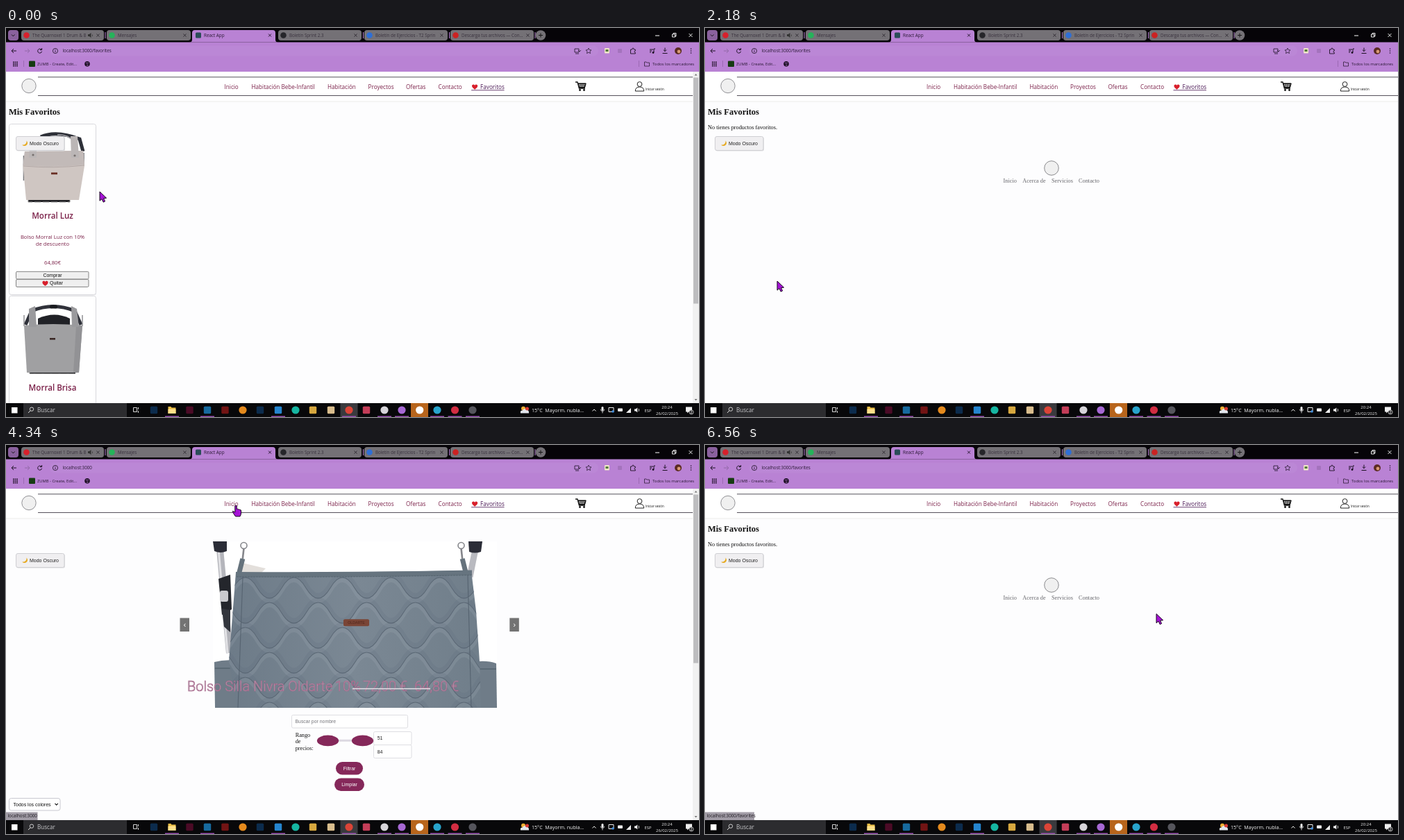
Recreate the animation shown at these times as an HTML page. Size 998 by 561 pixels, loop 6580 ms.

```html
<!DOCTYPE html>
<html lang="es">
<head>
<meta charset="utf-8">
<title>Mis Favoritos</title>
<style>
html, body { margin: 0; width: 100%; height: 100%; overflow: hidden; background: #fff; }
svg { display: block; width: 998px; height: 561px; }
text { white-space: pre; }
.ui { font-family: "Open Sans", "Noto Sans", sans-serif; }
.arial { font-family: "Liberation Sans", Arial, sans-serif; }
.serif { font-family: "Liberation Serif", "Times New Roman", serif; }
.thin { font-family: Roboto, "Open Sans", sans-serif; font-weight: 300; }
</style>
</head>
<body>
<svg id="stage" viewBox="0 0 998 561" xmlns="http://www.w3.org/2000/svg"></svg>
<script>
const LOOP = 6580;
const WINE = '#7b2149';
const PURPLE = '#b982d4';

// ---- drawing helpers ----
const rect = (x, y, w, h, fill, more = '') =>
  `<rect x="${x}" y="${y}" width="${w}" height="${h}" fill="${fill}" ${more}/>`;
const circle = (x, y, r, fill, more = '') =>
  `<circle cx="${x}" cy="${y}" r="${r}" fill="${fill}" ${more}/>`;
const path = (d, fill, more = '') => `<path d="${d}" fill="${fill}" ${more}/>`;
const line = (d, color, w = 1, more = '') =>
  path(d, 'none', `stroke="${color}" stroke-width="${w}" ${more}`);
const text = (x, y, s, size, fill, cls = 'ui', more = '') =>
  `<text x="${x}" y="${y}" font-size="${size}" fill="${fill}" class="${cls}" ${more}>${s}</text>`;
const mid = (x, y, s, size, fill, cls, more = '') =>
  text(x, y, s, size, fill, cls, 'text-anchor="middle" ' + more);
const group = (id, body, more = '') => `<g id="${id}" ${more}>${body}</g>`;
const move = (x, y, body) => `<g transform="translate(${x} ${y})">${body}</g>`;
const heart = (x, y) => move(x, y,
  path('M0 3.8C-2.6 1.8-4.1.4-4.1-1.4-4.1-4-.9-4.3 0-2.2.9-4.3 4.1-4 4.1-1.4 4.1.4 2.6 1.8 0 3.8Z', '#d8202c'));
const cross = (x, y, c, r = 2) =>
  line(`M${x - r} ${y - r}l${2 * r} ${2 * r}m0 ${-2 * r}l${-2 * r} ${2 * r}`, c, 0.9);

// ---- browser window ----
function tabs() {
  const list = [
    [22, 119, '#d8202c', 'The Quarnoxel 1 Drum &amp; B'],
    [145, 121, '#25b35a', 'Mensajes'],
    [392, 120, '#26262a', 'Boletín Sprint 2.3'],
    [516, 120, '#2f6fd6', 'Boletín de Ejercicios - T2 Sprin'],
    [640, 120, '#cc2222', 'Descarga tus archivos — Con...'],
  ];
  let s = rect(0, 0, 998, 20.5, '#060408');
  s += rect(3, 3, 15, 15, '#8a619e', 'rx="4"') + line('M8 9.5l2.3 2.3 2.3-2.3', '#111');
  for (const [x, w, color, name] of list) {
    s += rect(x, 3, w, 15, '#747176', 'rx="4"') + circle(x + 7.5, 10.5, 4.3, color);
    s += text(x + 16, 12.9, name, 6.2, '#38313d') + cross(x + w - 8.5, 10.5, '#26222a');
  }
  for (const x of [142.5, 514, 638, 761.5]) s += rect(x, 6, 1, 9, PURPLE);
  s += path('M118 9h2l2.5-2v7l-2.5-2h-2zM124 8.5q1.5 2 0 4z', '#333');
  s += path('M264 20.5Q268 20.5 268 17V7Q268 3 272 3H384Q388 3 388 7V17Q388 20.5 392 20.5Z', PURPLE);
  s += rect(273, 6.5, 8, 8, '#2b4d58', 'rx="1.5"') + text(285, 12.9, 'React App', 6.3, '#2a1935') + cross(380, 10.5, '#1d1024');
  s += circle(770, 10.5, 7.3, '#747176') + line('M767 10.5h6M770 7.5v6', '#161616');
  s += line('M935 11h6', '#fff') + line('M959.5 9h4v4h-4zM961 9V7.5h4V12h-1.5', '#fff', 0.9) + cross(986, 10.5, '#fff', 2.5);
  return s;
}

function toolbar() {
  const ink = '#1d1024';
  let s = rect(0, 20, 998, 43, PURPLE) + rect(63, 25.5, 790, 15, '#bb87d6', 'rx="7.5"');
  s += line('M15 33H8.5M11 30l-3 3 3 3', ink) + line('M27 33h6.5M31 30l3 3-3 3', '#9269a8');
  s += line('M51 31.2a3 3 0 1 0 .6 2.6M51.6 29v2.6H49', ink);
  s += circle(71, 33, 3.6, 'none', `stroke="${ink}" stroke-width=".8"`) + line('M71 32.5v2.4M71 30.8v.9', ink, 0.9);
  s += group('url', '');
  s += line('M819 30h6v5h-6zM820 37h5M824 32l2 2 2-2', ink, 0.8);
  s += path('M839 29l1.2 2.6 2.8.3-2.1 1.9.6 2.8-2.5-1.4-2.5 1.4.6-2.8-2.1-1.9 2.8-.3z', 'none', `stroke="${ink}" stroke-width=".7"`);
  s += rect(862, 29, 7, 7.5, '#efe5c8', 'rx="1"') + rect(863.5, 31, 4, 3, '#54793e');
  s += rect(881, 30, 6, 6, '#a473bd', 'rx="1"');
  s += line('M899.5 31h2.2q0-2 1.3-2t1.3 2h2v2q-1.3 0-1.3 1.2t1.3 1.2V37h-6.8z', ink, 0.9);
  s += line('M927 31h5M927 33h3M927 35h2M933 35V30h2', ink) + circle(932, 35.5, 1.4, ink);
  s += line('M949 28.5v5M946.8 31.5l2.2 2.2 2.2-2.2M945.5 36.5h7', ink);
  s += circle(968, 33, 5, '#5b2b22') + circle(969, 34, 2.4, '#d89a74');
  for (const y of [30, 33, 36]) s += circle(986.5, y, 0.8, ink);
  // bookmarks
  for (let i = 0; i < 9; i++) s += rect(10 + i % 3 * 2.6, 48.5 + Math.floor(i / 3) * 2.6, 1.7, 1.7, ink);
  s += line('M25.5 47v9', '#9365aa', 0.8) + rect(33, 47.5, 9, 8.5, '#163b12', 'rx="1"');
  s += text(45, 54, 'ZUMB - Create, Edit...', 5.8, '#2a1935');
  s += circle(117, 51.7, 3.8, ink) + line('M115 50q2 2 4 0M116 53.5h2.5', PURPLE, 0.8);
  s += line('M911.5 47v9', '#9365aa', 0.8) + line('M919.5 49h2.5l1 1h3.5v5h-7z', ink, 0.7);
  return s + text(931, 54, 'Todos los marcadores', 5.9, '#2a1935');
}

// ---- site header ----
function header() {
  let s = rect(0, 63, 998, 43, '#fff') + rect(0, 105.5, 998, 1, '#ececec');
  s += line('M46 70.8H998M46 97.5H998', '#55505a', 1);
  s += circle(33, 83.5, 10.2, '#f0f0f0', 'stroke="#77777c" stroke-width=".8"');
  const links = [[319, 'Inicio'], [358, 'Habitación Bebe-Infantil'], [467.5, 'Habitación'],
    [526, 'Proyectos'], [580.5, 'Ofertas'], [627, 'Contacto']];
  let nav = links.map(([x, n]) => text(x, 88, n, 8.15, WINE)).join('');
  nav += heart(679.5, 85) + text(687.5, 88, 'Favoritos', 8.15, '#4a1754') + line('M674.5 89.7H722', '#4a1754', 0.8);
  s += group('nav', nav);
  let tools = line('M829 78h3l2.4 9h8.6M832.8 80.5h11l-1.6 5H834', '#111', 1.3);
  tools += path('M833 80h11l-1.6 6H834.5z', 'none', 'stroke="#111" stroke-width="1"');
  tools += line('M836 80v6M838.5 80v6M841 80v6M833.5 83h10', '#111', 0.8);
  tools += circle(835.5, 89.5, 1.4, '#111') + circle(841.5, 89.5, 1.4, '#111');
  tools += circle(921.5, 81, 3.4, 'none', 'stroke="#222" stroke-width="1"');
  tools += line('M915.3 91q0-6 6.2-6t6.2 6z', '#222', 1) + text(930, 90.2, 'Iniciar sesión', 4.4, '#111');
  return s + group('tools', tools);
}

// ---- favourites page ----
function bagLight() {
  return line('M50 157Q72 147 106 160L111 178', '#2e3038', 5) + line('M74 154Q88 153 99 164', '#9a9a9f', 1.6) +
    line('M25.5 184V220M112 180V198', '#77777b', 1.6) +
    rect(32, 245, 60, 6, '#202024', 'stroke="#888" stroke-dasharray="9 3"') +
    path('M27 178L111 177 113 199 105 248H29L24.5 199Z', '#cfc6c2') +
    path('M27 178L111 177 113 197Q68 202 24.5 198Z', '#c2bab8') +
    line('M25 199Q68 203 113 198', '#aaa09f', 0.8) +
    path('M93 156h10l2 31H94z', '#bbb6b6') + path('M35 160h9v27h-11z', '#bbb6b6') +
    circle(39, 183, 1.6, '#77716f') + circle(99, 184, 1.6, '#77716f') + rect(65, 208.4, 9, 2.8, '#6a2f25');
}
function bagGrey() {
  return line('M28 180L37 160Q68 147 99 160L108 180', '#30323a', 5) + rect(63, 151.5, 11, 5, '#191a1e', 'rx="2"') +
    path('M46 182V171Q70 160 92 171V182Z', '#202126') + line('M26 166v16M110 166v16', '#8a8a8e', 1.4) +
    rect(34, 245, 66, 5.5, '#222327', 'stroke="#888" stroke-dasharray="9 3"') +
    path('M26 181Q68 177 110 181L105 249 30 249Z', '#a0a0a2') +
    path('M101 181L110 181 105 249H97z', '#929295') +
    path('M33 157l9-4 2 30H33z', '#9a9a9d') + path('M94 153l8 4 3 26H95z', '#9a9a9d') +
    rect(63, 199, 8, 2.6, '#3a2825');
}
function button(y, label, icon = '') {
  return rect(14.5, y, 104.5, 10.8, '#efefef', 'rx="1.5" stroke="#767676" stroke-width=".9"') + icon +
    mid(icon ? 72.5 : 67, y + 7.8, label, 7, '#111', 'arial');
}
function card(h, bag, title, desc, price) {
  let s = rect(5, 139.5, 125, h, '#e9e9ec', 'rx="3"') + rect(4.5, 138.5, 125, h, '#fff', 'rx="3" stroke="#d9d9dd" stroke-width="1"');
  s += bag + mid(67, 275.2, title, 11.6, WINE, 'ui', 'font-weight="600"');
  desc.forEach((d, i) => s += mid(67, 304 + i * 10, d, 7.7, WINE, 'ui'));
  s += mid(67, 340.6, price, 7.7, WINE, 'ui');
  return s + button(351.3, 'Comprar') + button(362.6, 'Quitar', heart(56.5, 368.3));
}
const cardLight = card(246, bagLight(), 'Morral Luz', ['Bolso Morral Luz con 10%', 'de descuento'], '64,80€');
const cardGrey = card(247, bagGrey(), 'Morral Brisa', ['Bolso de Morral Brisa con', '35% de descuento'], '51,80€');

function footer(y) {
  const links = [[429.5, 'Inicio'], [457.3, 'Acerca de'], [499, 'Servicios'], [538, 'Contacto']];
  return circle(499, y, 10.3, '#f0f0f0', 'stroke="#707074" stroke-width=".8"') +
    links.map(([x, n]) => text(x, y + 21, n, 8.3, '#66666b', 'serif')).join('');
}
const heading = text(4, 124.6, 'Mis Favoritos', 12.5, '#111', 'serif', 'font-weight="700"');

// ---- home page ----
function quilt() {
  let s = '';
  for (let row = 0; row < 7; row++) {
    const x = 257 + (row % 2) * 35, d = `M${x} ${206 + row * 36}q17.5 -30 35 0` + 't35 0'.repeat(13);
    s += move(0, -4, line(d, '#586674', 7, 'opacity=".16"')) + move(0, 4, line(d, '#a3aeb8', 6, 'opacity=".2"'));
    s += line(d, '#5a6774', 1.1);
  }
  return s;
}
function bigBag() {
  let s = rect(298, 139, 409, 240, '#fff');
  s += line('M308 150L322 300', '#b4b5bb', 10) + line('M306 150L319 300', '#e2e2e5', 3) + line('M676 150L668 190', '#b9bac0', 9);
  s += path('M298 139h20v14q-9 4-18 0z', '#2b2d37') + path('M666 139h20l-2 15q-9 3-17 0z', '#2b2d37');
  s += path('M306 193l17-6 2 50-14 8z', '#24262c') + rect(308, 210, 12, 16, '#c9c9cd', 'rx="3"') + path('M311 236l12 2v32l-9-8z', '#33363d');
  s += path('M340 170l34 8-6 6-30 1z', '#e3dfdb');
  for (const x of [342.5, 655.5]) {
    const side = x < 500 ? -5 : 5;
    s += circle(x, 145, 4.5, 'none', 'stroke="#85868b" stroke-width="1.6"') + line(`M${x} 149l${side / 3} 15`, '#85868b', 2.6);
    s += line(`M${x + side / 3} 164l${side * 1.2} 24`, '#65727c', 7);
  }
  s += path('M300 313Q318 308 341 312V379H301Z', '#6f7c88') + path('M667 314Q690 309 706 315L707 379H667Z', '#6f7c88');
  s += line('M301 322H340M668 323H706', '#566470', 1.5);
  const body = 'M331 184Q500 184 670 181L677 240 682 312 684 379H332L321 312Z';
  s += path(body, 'url(#cloth)') + `<clipPath id="body">${path(body, '#000')}</clipPath><g clip-path="url(#body)">${quilt()}</g>`;
  s += path('M331 183Q500 184 671 180.5V187.5Q500 191 331 190Z', '#66747f') + line('M332 190Q500 191 671 187.5', '#4f5d68', 0.8, 'stroke-dasharray="3 1"');
  s += line('M341 190L334 379M665 188L670 379', '#566370', 1.1);
  return s + rect(486, 251.3, 37, 10, '#7a4536', 'rx="2"') + mid(504.5, 258.4, 'OLDARTE', 5.2, '#4d2419', 'arial');
}
function home() {
  let s = `<clipPath id="slide">${rect(261, 139, 467, 240, '#000')}</clipPath><g clip-path="url(#slide)">${bigBag()}</g>`;
  const caption = [[261, 'Bolso Silla Nivra Oldarte'], [474, '10%'], [514, '72,00 €'], [588, '64,80 €']];
  for (const [x, c] of caption)
    s += text(x, 355, c, 20, '#b3aab6', 'thin', 'stroke="#a95c85" stroke-width=".6"');
  s += line('M499 351.5H611', '#e4dfe6', 1.4);
  for (const [x, c] of [[250.5, '‹'], [725.3, '›']])
    s += rect(x, 249.5, 13.5, 19.5, '#737373') + mid(x + 6.8, 262.6, c, 11.5, '#fff', 'arial');
  const field = (x, y, w, h) => rect(x, y, w, h, '#fff', 'rx="2" stroke="#dedee2" stroke-width="1"');
  s += field(411.5, 389.5, 167, 18.5) + text(416.5, 401, 'Buscar por nombre', 6.9, '#75757a', 'arial');
  ['Rango', 'de', 'precios:'].forEach((w, i) => s += text(416.7, 421 + i * 9.3, w, 8.2, '#111', 'serif'));
  s += rect(470, 424.7, 40, 3, '#dcd9e2');
  for (const x of [463.5, 513.5]) s += `<ellipse cx="${x}" cy="426.4" rx="15.6" ry="7.8" fill="#85285a"/>`;
  s += field(529.5, 413.5, 54.5, 19) + field(529.5, 432.5, 54.5, 19);
  s += text(534.7, 425.4, '51', 7, '#222', 'arial') + text(534.7, 444.6, '84', 7, '#222', 'arial');
  s += rect(475, 457, 39, 18.5, '#85285a', 'rx="9.2"') + mid(494.5, 468.7, 'Filtrar', 6.9, '#fff', 'arial');
  s += rect(473, 480.5, 43, 18.5, '#85285a', 'rx="9.2"') + mid(494.5, 492.2, 'Limpiar', 6.9, '#fff', 'arial');
  s += rect(4.5, 509.5, 73.5, 17.5, '#fff', 'rx="3" stroke="#c8c8d0" stroke-width="1"');
  return s + text(10.5, 520.8, 'Todos los colores', 7, '#111', 'arial') + line('M70.5 517l2.2 2.2 2.2-2.2', '#222', 1.1);
}

const darkMode = rect(15, 157.5, 70, 20, '#dfdfe1', 'rx="2.5"') +
  rect(14.5, 156.5, 69.5, 20, '#f0eff1', 'rx="2.5" stroke="#cfcfd3" stroke-width="1"') +
  path('M29.5 162.5A4.3 4.3 0 1 1 23.3 168.4 5 5 0 0 0 29.5 162.5Z', '#e6a91c') +
  text(34, 169.4, 'Modo Oscuro', 7, '#222', 'arial');

// ---- taskbar ----
function taskbar() {
  let s = rect(0, 541, 998, 20, '#08080a') + rect(25, 541, 149, 20, '#2c2c2f');
  s += rect(8, 547, 8.5, 8.5, '#fff') + circle(37, 549.7, 2.7, 'none', 'stroke="#ddd" stroke-width=".9"') + line('M35 552l-3 3', '#ddd');
  s += text(45, 554, 'Buscar', 8.1, '#c9c9cc', 'ui');
  s += line('M183.5 547.5h5v6h-5zM190.5 547v3M190.5 552v3', '#eee', 0.9);
  s += rect(481.5, 541, 25, 20, '#3a3a3e') + rect(583, 541, 25, 20, '#b8651c');
  const icons = [[213, '#0c2c4d'], [264.5, '#4b0b26'], [290, '#176a9e'], [315.5, '#721414'], [341, '#e58a1d', 1],
    [366, '#0c2c4d'], [392, '#2585cf'], [417, '#16b6a2', 1], [442, '#d7a83f'], [468, '#d9bd8d'],
    [494, '#db4437', 1], [519, '#c33d58'], [545, '#d7d5da', 1], [570, '#a668d4', 1], [595.7, '#fff', 1],
    [621, '#28a4cc', 1], [646.5, '#d22d42', 1], [672, '#55555c', 1]];
  for (const [x, c, round] of icons)
    s += round ? circle(x, 551, 5.6, c) : rect(x - 5.2, 545.8, 10.4, 10.4, c, 'rx="1.5"');
  s += path('M233.5 546h4l1 1.5h6V556h-11z', '#e9bd45') + rect(233.5, 549.5, 11, 6.5, '#ffe08a', 'rx=".5"');
  for (const x of [239, 290, 392, 494, 545, 570, 621, 646.5, 672]) s += rect(x - 10, 559.6, 20, 1.4, '#9b50b5');
  s += circle(745, 548.8, 3, '#f2b134') + path('M741 555.5q-1-4 3-4 2-4 5.5-.8 4 0 3.5 4.8z', '#e3e7ee') + circle(750.5, 549, 2.5, '#db3c36');
  s += text(757, 553.7, '15°C  Mayorm. nubla...', 7.1, '#f2f2f2');
  s += line('M844.5 552.5l2.5-2.5 2.5 2.5', '#eee') + rect(857.5, 546, 3, 6, '#eee', 'rx="1.5"') + line('M856 550q3 6 6 0M859 553v2.5', '#eee', 0.8);
  s += line('M868 547.5h7v6h-7z', '#eee', 1) + circle(874, 553, 1.8, '#3e8ede');
  s += rect(881, 548.5, 7, 4.5, '#eee', 'rx="1"') + path('M893 555h7v-7z', '#eee');
  s += path('M905 549.5h2l2.3-2v7l-2.3-2h-2z', '#eee') + line('M911 549q1.5 2 0 4', '#eee', 0.8);
  s += mid(924.5, 553.5, 'ESP', 5.8, '#eee', 'ui') + mid(952, 549, '20:24', 6, '#eee', 'ui') + mid(952, 558, '26/02/2025', 6, '#eee', 'ui');
  return s + path('M979 546.5h9v7h-5l-2 2v-2h-2z', '#eee') + circle(987, 554, 3.1, '#1c1c1e', 'stroke="#eee" stroke-width=".7"') + mid(987, 556, '2', 5.4, '#fff', 'arial');
}

const scrollbar = rect(989, 63, 9, 478, '#f1f1f1') + path('M991.5 68.5h4l-2-2.5zM991.5 535h4l-2 2.5z', '#777') +
  '<rect id="thumb" x="990" y="71.5" width="7" fill="#bdbdbf"/>';

const outline = 'stroke="#170a1c" stroke-width="1" stroke-linejoin="round"';
const arrow = path('M0 0V13.2L3 10.6 5.2 15.2 7.6 14 5.5 9.7 9.6 9.2Z', '#a512d6', outline);
const hand = path('M-1.2 1Q0-.8 1.3 1V5.5Q2.6 4.5 3.5 6 4.8 5 5.7 6.6 7.6 6 7.6 8V11Q7.4 14 6 16H-.5L-2.5 13-4 10.5-4.5 8.3-1.2 10Z', '#a512d6', outline);

const stage = document.getElementById('stage');
stage.innerHTML =
  `<defs><linearGradient id="cloth"><stop offset="0" stop-color="#6d7b88"/><stop offset=".5" stop-color="#7b8894"/><stop offset="1" stop-color="#707e8a"/></linearGradient></defs>` +
  rect(0, 63, 998, 478, '#fdfdfe') +
  group('two', heading + cardLight + move(0, 248, cardGrey)) +
  group('one', heading + move(0, 0.7, cardGrey) + footer(432)) +
  group('empty', heading + text(4, 145.6, 'No tienes productos favoritos.', 8.3, '#111', 'serif') + footer(202)) +
  group('home', home()) + darkMode + header() + group('bar', scrollbar) +
  group('status', '<rect y="529.5" height="11.5" fill="#a19ca6"/>' + text(2.5, 537.4, '', 6.3, '#1c181f')) +
  toolbar() + tabs() + taskbar() + group('cursor', group('arrow', arrow) + group('hand', hand));

// ---- timeline ----
const pages = [[0, 'two'], [1000, 'one'], [1700, 'empty'], [4200, 'home'], [6150, 'empty']];
const hints = [[0, ''], [4040, 'localhost:3000'], [4760, ''], [5880, 'localhost:3000/favorites']];
const route = [[0, 135, 236], [580, 104, 365], [2690, 104, 365], [3680, 343, 111], [3800, 343, 111],
  [4060, 331, 87], [4420, 331, 87], [5120, 670, 287.5], [5380, 670, 287.5], [5900, 698, 86], [6220, 698, 86], [6540, 650, 243.5]];
const at = (steps, t) => steps.filter(s => s[0] <= t).pop()[1];
const el = Object.fromEntries([...stage.querySelectorAll('[id]')].map(n => [n.id, n]));
const show = (node, on) => node.style.display = on ? '' : 'none';

function pointer(t) {
  const i = route.findIndex(p => p[0] > t);
  if (i < 0) return route[route.length - 1].slice(1);
  const [t0, x0, y0] = route[i - 1], [t1, x1, y1] = route[i];
  const k = (1 - Math.cos(Math.PI * (t - t0) / (t1 - t0))) / 2;
  return [x0 + (x1 - x0) * k, y0 + (y1 - y0) * k];
}

let lastKey = '';
function draw() {
  const t = performance.now() % LOOP, page = at(pages, t), hint = at(hints, t);
  if (page + hint !== lastKey) {
    lastKey = page + hint;
    for (const p of ['two', 'one', 'empty', 'home']) show(el[p], p === page);
    const long = page === 'two' || page === 'home';
    show(el.bar, long);
    el.thumb.setAttribute('height', page === 'home' ? 243 : 326);
    el.nav.setAttribute('transform', `translate(${long ? -4.4 : 0} 0)`);
    el.tools.setAttribute('transform', `translate(${long ? -9 : 0} 0)`);
    el.url.innerHTML = text(81.5, 35.2, 'localhost:3000' + (page === 'home' ? '' : '/favorites'), 6.3, '#2a1935');
    show(el.status, hint);
    el.status.firstChild.setAttribute('width', hint.length > 14 ? 71 : 45.5);
    el.status.lastChild.textContent = hint;
  }
  const [x, y] = pointer(t), onLink = y < 92;
  el.cursor.setAttribute('transform', `translate(${x.toFixed(1)} ${y.toFixed(1)})`);
  show(el.hand, onLink);
  show(el.arrow, !onLink);
  requestAnimationFrame(draw);
}
draw();
</script>
</body>
</html>
```
